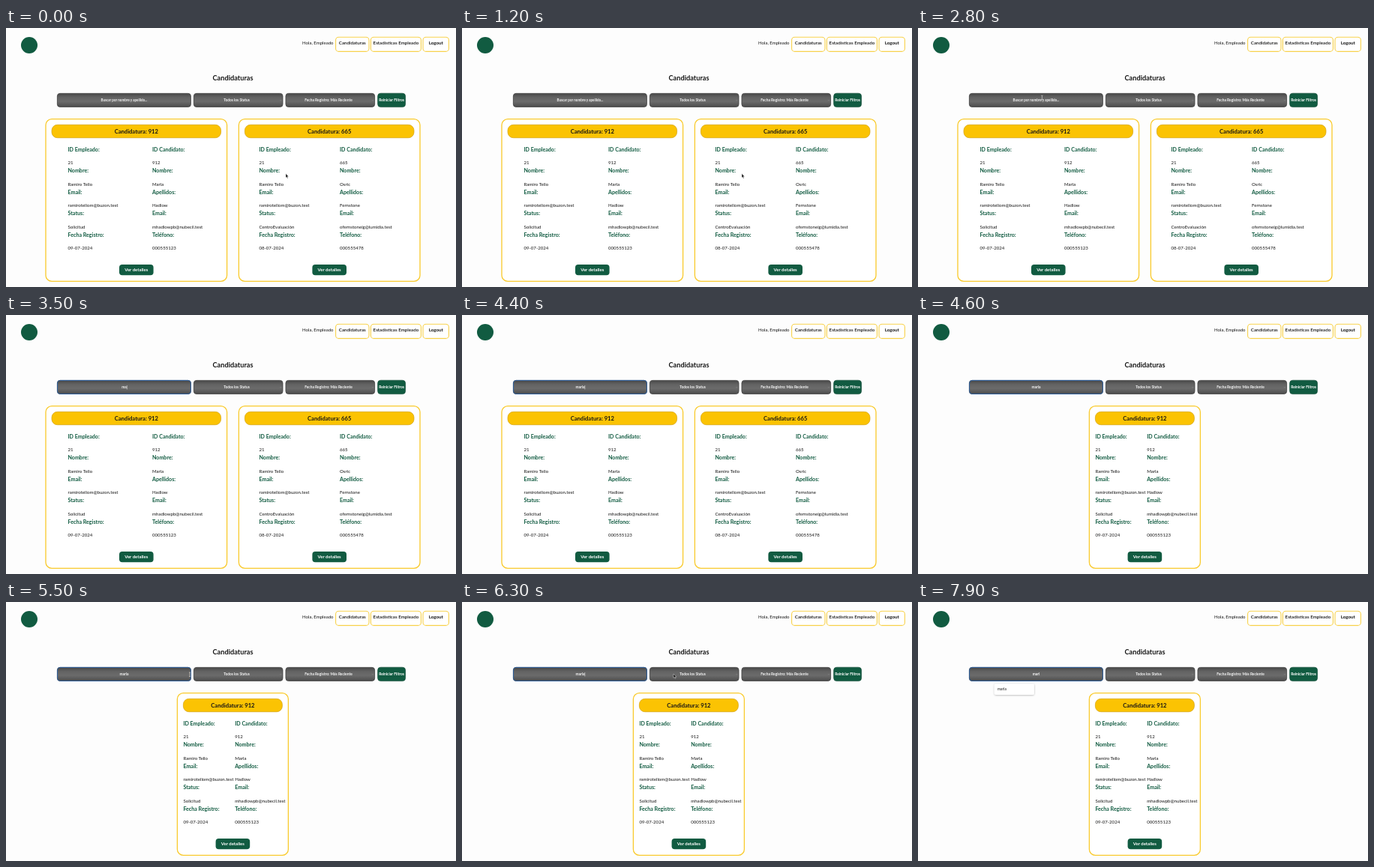
Write an HTML page that moves like this. It is 600x346 px and loops after 8000 ms.

```html
<!DOCTYPE html>
<html lang="es">
<head>
<meta charset="utf-8">
<title>Candidaturas</title>
<style>
  html, body { margin: 0; width: 100%; height: 100%; overflow: hidden; background: #fdfdfd; }
  svg { display: block; width: 600px; height: 346px; }
  text { font-family: Lato, sans-serif; white-space: pre; }
</style>
</head>
<body>
<svg id="stage" viewBox="0 0 600 346" xmlns="http://www.w3.org/2000/svg">
  <defs>
    <linearGradient id="field" x1="0" y1="0" x2="0" y2="1">
      <stop offset="0" stop-color="#484848"/>
      <stop offset=".3" stop-color="#636363"/>
      <stop offset=".6" stop-color="#6b6b6b"/>
      <stop offset="1" stop-color="#4c4c4c"/>
    </linearGradient>
    <filter id="soft" x="-10%" y="-30%" width="120%" height="180%">
      <feDropShadow dx="0" dy=".6" stdDeviation=".9" flood-opacity=".3"/>
    </filter>
  </defs>
</svg>
<script>
const LOOP = 8000, TICK = 100;
const GREEN = '#115b41', YELLOW = '#fbc303', INK = '#151515';
const NAME = 'marla';
const stage = document.getElementById('stage');

function add(tag, attrs, parent = stage) {
  const el = document.createElementNS('http://www.w3.org/2000/svg', tag);
  for (const key in attrs) el.setAttribute(key, attrs[key]);
  return parent.appendChild(el);
}
const group = () => add('g', {});
const box = (x, y, w, h, r, fill, parent, extra = {}) =>
  add('rect', { x, y, width: w, height: h, rx: r, fill, ...extra }, parent);

function label(str, x, y, size, parent, { fill = INK, weight = 400, anchor = 'start' } = {}) {
  const el = add('text', { x, y, 'font-size': size, fill, 'font-weight': weight, 'text-anchor': anchor }, parent);
  el.textContent = str;
  return el;
}
function button(str, x, y, w, h, size, parent, fill = GREEN, extra = {}) {
  box(x, y, w, h, 4, fill, parent, extra);
  label(str, x + w / 2, y + h / 2 + size * .35, size, parent, { fill: '#fff', weight: 700, anchor: 'middle' });
}

// Header
const page = group();
add('circle', { cx: 31, cy: 23, r: 11, fill: GREEN }, page);
label('Hola, Empleado', 395, 21.5, 6.05, page);
for (const [str, x, w, weight] of [
  ['Candidaturas', 439.6, 44.4, 600], ['Estadísticas Empleado', 486.4, 67, 600], ['Logout', 556, 34.4, 700]
]) {
  box(x, 12.2, w, 19.2, 4, '#fff', page, { stroke: '#f8d24c', 'stroke-width': 1.1 });
  label(str, x + w / 2, 22.2, 6.2, page, { weight, anchor: 'middle' });
}
label('Candidaturas', 302.5, 70.4, 9.2, page, { weight: 700, anchor: 'middle' });

// Filters
const white = { fill: '#f4f4f4', weight: 700, anchor: 'middle' };
for (const [x, w] of [[68.4, 178], [250.4, 118.6], [373, 118.6]])
  box(x, 87.4, w, 18, 3.5, 'url(#field)', page, { stroke: '#474747', 'stroke-width': .9 });
label('Todos los Status', 307.5, 98.3, 4.85, page, white);
label('Fecha Registro: Más Reciente', 430, 98.3, 4.9, page, white);
for (const x of [366.4, 488.8])
  add('path', { d: `M${x - .9} 96.2l.9 .9 .9-.9`, fill: 'none', stroke: '#999', 'stroke-width': .5 }, page);
button('Reiniciar Filtros', 495.6, 87.2, 37, 18.4, 4.95, page, GREEN, { stroke: '#0b4430', 'stroke-width': .6 });
const focusRing = box(68.6, 87.4, 177.8, 18, 3.5, 'none', page, { stroke: '#2c5f9e', 'stroke-width': 1 });
const query = label('', 157.5, 98.3, 4.9, page, white);
const caret = box(165, 94, .5, 5.4, 0, '#fff', page);

// Cards
const FIELDS = [
  ['ID Empleado:', 'ID Candidato:'], ['Nombre:', 'Nombre:'], ['Email:', 'Apellidos:'],
  ['Status:', 'Email:'], ['Fecha Registro:', 'Teléfono:']
];
function card(parent, x, w, columns, values) {
  const mid = x + w / 2;
  box(x, 121.6, w, 216.8, 8, '#fff', parent, { stroke: '#f9ca2c', 'stroke-width': 1.3 });
  box(x + 8, 129.3, w - 16, 17.4, 7.5, YELLOW, parent, { stroke: '#d3a315', 'stroke-width': .7 });
  label('Candidatura: ' + values[0][1], mid, 140.7, 7.6, parent, { weight: 700, anchor: 'middle' });
  FIELDS.forEach((pair, row) => pair.forEach((name, col) => {
    const y = 164.5 + row * 28.6;
    label(name, columns[col], y, 7.1, parent, { fill: GREEN, weight: 700 });
    label(values[row][col], columns[col], y + 17.4, 6.1, parent);
  }));
  button('Ver detalles', mid - 22.8, 316, 45.6, 14.2, 6, parent);
}
const employee = 'Ramiro Tello', mail = 'ramirotellom@buzon.test';
const first = [
  ['21', '912'], [employee, 'Marla'], [mail, 'Hadlow'],
  ['Solicitud', 'mhadlowpb@nubecil.test'], ['09-07-2024', '000555123']
];
const second = [
  ['21', '665'], [employee, 'Osric'], [mail, 'Fernstone'],
  ['CentroEvaluación', 'ofernstoneig@lumidia.test'], ['08-07-2024', '000555478']
];
const allCards = group(), oneCard = group(), loading = group();
card(allCards, 53, 241.6, [82.5, 195], first);
card(allCards, 310.4, 241.6, [337.5, 445], second);
card(oneCard, 228.4, 148, [236.4, 305.2], first);

// Loading view
box(277.4, 137.6, 50.4, 14.8, 7.4, '#fff', loading, { stroke: GREEN, 'stroke-width': 1.7 });
add('path', { d: 'M285.8 140v10.4c-3.4 0-5.8-2.2-5.8-5.2s2.4-5.2 5.8-5.2z', fill: YELLOW }, loading);
button('Previous', 209.2, 192.8, 58.6, 18.4, 6.3, loading);
button('1', 271.6, 193, 58, 18, 6.3, loading, YELLOW, { stroke: '#222', 'stroke-width': 1 });
button('Next', 333.6, 192.8, 58.6, 18.4, 6.3, loading);
box(0, 289, 600, 57, 0, GREEN, loading);
[228, 265, 302.4, 339.6, 376.8].forEach((x, i) => i
  ? box(x - 4.8, 308.2, 9.6, 9.6, 0, '#fff', loading)
  : add('circle', { cx: x, cy: 313, r: 5, fill: '#fff' }, loading));
label('© 2024 Semilla Por Brotar. Socio de la red internacional Guide For Kin Política de cookies | Aviso legal | Política de privacidad y protección de datos',
  302.3, 326.3, 4.95, loading, { fill: '#fff', weight: 700, anchor: 'middle' });

// Autocomplete popup
const popup = group();
box(101.8, 109, 53.2, 15, 2.5, '#fff', popup, { filter: 'url(#soft)' });
label(NAME, 106, 118, 4.9, popup);

// Pointer
const pointer = group();
const arrow = add('path', {
  d: 'M0 0v5.4l1.2-1.1.9 2 .9-.4-.9-1.9h1.7z', fill: '#111', stroke: '#fff', 'stroke-width': .4
}, pointer);
const beam = add('path', {
  d: 'M-1.1-.3q1.1 0 1.1.7 0-.7 1.1-.7M0 .4v4.4M-1.1 5.4q1.1 0 1.1-.6 0 .6 1.1 .6',
  fill: 'none', stroke: '#ddd', 'stroke-width': .6
}, pointer);

const PATH = [ // ms, x, y
  [0, 373, 194.6], [1200, 373, 194.6], [2400, 165.4, 90.4], [5000, 165.4, 90.4],
  [5800, 282, 96], [6300, 282, 96], [6600, 297, 97], [6700, 298, 97.4],
  [6900, 298, 97.4], [7500, 199, 92], [LOOP, 199, 92]
];
function pointerAt(t) {
  const i = PATH.findIndex(p => p[0] > t);
  const [a, ax, ay] = PATH[i - 1], [b, bx, by] = PATH[i];
  const u = (t - a) / (b - a), k = u * u * (3 - 2 * u);
  return [ax + (bx - ax) * k, ay + (by - ay) * k];
}
const show = (el, on) => el.setAttribute('visibility', on ? 'inherit' : 'hidden');

const TYPE_START = 3150, KEY_GAP = 200, ERASE = 7800;
const TYPE_END = TYPE_START + KEY_GAP * (NAME.length - 1);

function render(t) {
  const typed = t >= ERASE ? NAME.length - 1
    : Math.max(0, Math.min(NAME.length, Math.floor((t - TYPE_START) / KEY_GAP) + 1));
  query.textContent = typed ? NAME.slice(0, typed) : 'Buscar por nombre y apellido...';
  query.setAttribute('font-size', typed ? 4.9 : 4.55);

  const focused = t >= 2900;
  show(focusRing, focused);
  const blink = t < TYPE_END || (t - TYPE_END) % 1000 < 500;
  show(caret, focused && blink && t < ERASE);
  caret.setAttribute('x', 157.6 + (typed ? query.getComputedTextLength() / 2 : 0));

  show(allCards, t < 4500);
  show(loading, t >= 4500 && t < 4600);
  show(oneCard, t >= 4600);
  show(popup, t >= 7900);

  const [x, y] = pointerAt(t);
  const inField = x > 68 && x < 247 && y > 87 && y < 106;
  pointer.setAttribute('transform', `translate(${x} ${y})`);
  show(pointer, t < 3100 || (t >= 5000 && t < ERASE));
  show(arrow, !inField);
  show(beam, inField);
}

const start = performance.now();
function loop() {
  const t = (performance.now() - start) % LOOP;
  render(Math.floor(t / TICK) * TICK);
  requestAnimationFrame(loop);
}
loop();
</script>
</body>
</html>
```
